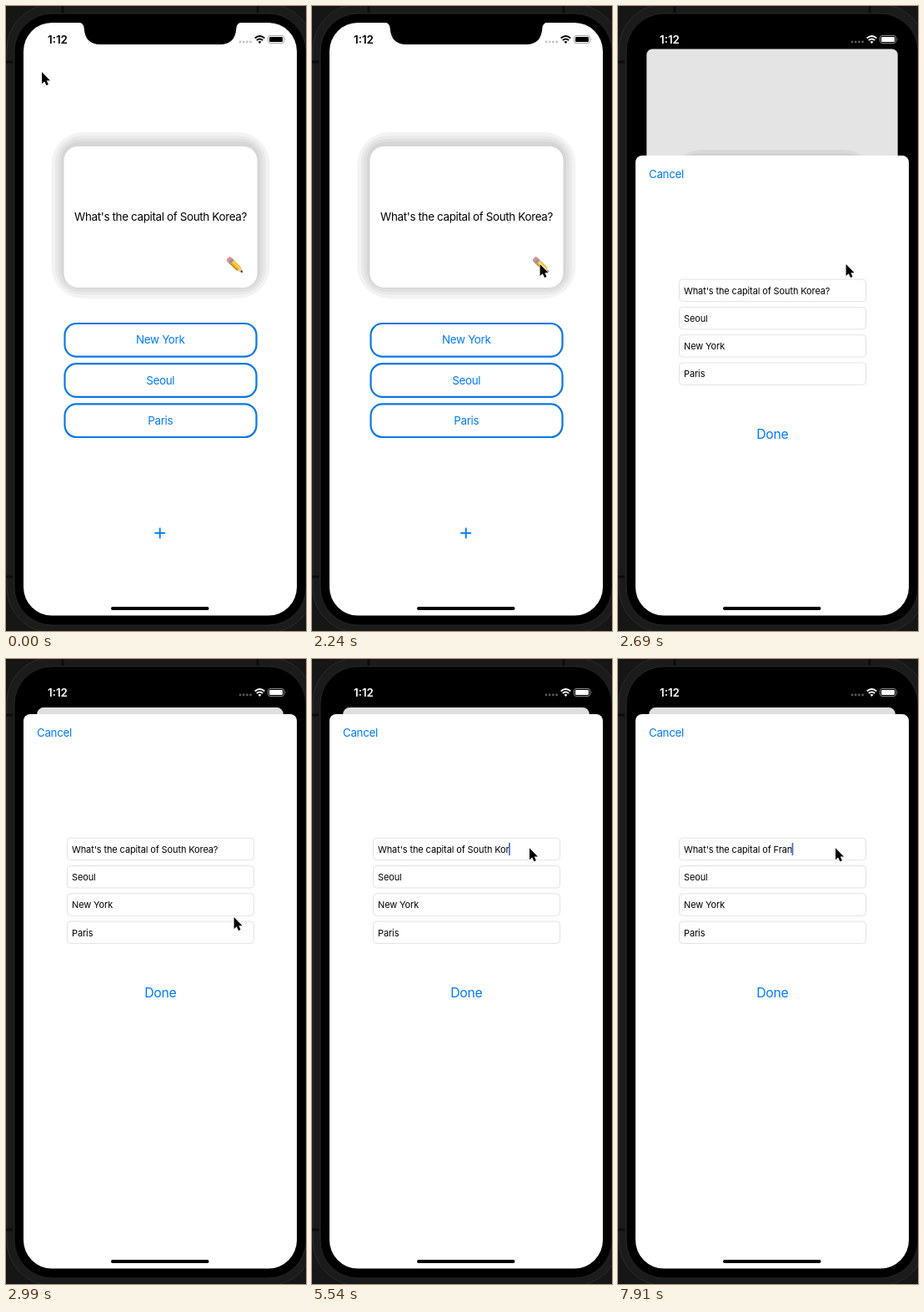
An HTML page that plays this animation: 360 px wide and 748 px high, repeating every 8 s.

```html
<!DOCTYPE html>
<html lang="en">
<head>
<meta charset="utf-8">
<title>Quiz card editor</title>
<style>
  html, body { margin: 0; height: 100%; overflow: hidden; background: #161616; }
  svg { display: block; width: 100%; height: 100%; }
  text { font: 13.4px Inter, "Open Sans", sans-serif; letter-spacing: -.34px; white-space: pre; }
  .mid { text-anchor: middle; }
  .tint { fill: #007aff; }
  .clock { font-weight: 600; letter-spacing: 0; }
  .done { font-size: 15.8px; letter-spacing: -.36px; }
  #fields text { font-size: 11px; letter-spacing: -.12px; }
</style>
</head>
<body>
<svg viewBox="0 0 360 748">
  <defs>
    <clipPath id="screen"><rect x="21" y="20" width="328" height="709.5" rx="34"/></clipPath>
  </defs>

  <g id="phone">
    <rect x="1" y="-2" width="368" height="752" rx="54" fill="#1b1b1b" stroke="#2b2b2b"/>
    <path d="M0 67h8M0 683h8M68 0v8M302 0v8" stroke="#0c0c0c" stroke-width="3"/>
    <rect x="10" y="9" width="350" height="732" rx="45" stroke="#262626"/>
  </g>

  <g clip-path="url(#screen)">
    <g id="quiz">
      <rect id="page" x="21" y="20" width="328" height="720" fill="#fff"/>
      <g id="shadow"></g>
      <rect x="69.5" y="168" width="232" height="169" rx="17" fill="#fff"/>
      <text class="mid" x="185.5" y="257.3">What's the capital of South Korea?</text>
      <g transform="translate(266.3 301.8) rotate(44)">
        <rect y="-3.4" width="6" height="6.8" rx="2" fill="#e58a93"/>
        <rect x="3.8" y="-3.4" width="3.4" height="6.8" fill="#8d979c"/>
        <rect x="7" y="-3.4" width="11.5" height="6.8" fill="#f5b52e"/>
        <path d="M7-1.2h11.5" stroke="#fbd65c" stroke-width="1.8"/>
        <path d="M7 2.6h11.5" stroke="#c98416" stroke-width="1.6"/>
        <path d="M18.5-3.4 24.5 0 18.5 3.4Z" fill="#e9c699"/>
        <path d="M22-1.5 25 0 22 1.5Z" fill="#333"/>
      </g>
      <g id="answers"></g>
      <path d="M178.3 630.8h12.8M184.7 624.4v12.8" stroke="#007aff" stroke-width="1.9"/>
      <rect id="dim" x="21" y="20" width="328" height="720"/>
    </g>

    <g id="sheet">
      <rect x="21" y="66" width="328" height="700" rx="8" fill="#fff"/>
      <text class="tint" x="37" y="93.3">Cancel</text>
      <g id="fields"></g>
      <rect id="caret" y="220" width="1.7" height="15" fill="#4468dc"/>
      <text class="tint mid done" x="185.3" y="405">Done</text>
    </g>
    <rect x="126" y="719" width="117.5" height="4" rx="2"/>
  </g>

  <path d="M86 19Q93.5 20 93.7 27Q95 46 113 46H257Q275 46 276.3 27Q276.500 20 284 19Z"/>

  <g id="status">
    <text class="clock" x="50" y="44.6">1:12</text>
    <path d="M281 43h13" stroke="#999" stroke-opacity=".6" stroke-width="2.8" stroke-linecap="round" stroke-dasharray="0 4.200"/>
    <g fill="none" stroke="currentColor" stroke-width="1.9">
      <path d="M298.700 38.500q5.800-5 11.600 0M300.800 41q3.700-3.200 7.400 0"/>
    </g>
    <path d="M304.500 45l-2-2.200q2-1.500 4 0Z"/>
    <rect x="314.500" y="35.500" width="19" height="9" rx="2.500" fill="none" stroke="#999" stroke-width=".9"/>
    <rect x="316" y="37" width="16" height="6" rx="1.200"/>
    <path d="M335 38.500q1.500 1.500 0 3Z" fill="#999"/>
  </g>

  <path id="cursor" d="M0 0V14L3.200 11.200 5.400 16 7.900 14.900 5.800 10.200H10Z"
        stroke="#fff" stroke-width="1.500" paint-order="stroke"/>
</svg>

<script>
const LOOP = 8000;
const $ = id => document.getElementById(id);

// Each row holds from its start time until the next: [ms, ...values]
const pointer = [
  [0, 43, 79], [740, 90, 190], [890, 190, 420], [1040, 285, 602],
  [1340, 358.7, 703], [1490, 350, 640], [1640, 330, 540], [1790, 308, 440],
  [1940, 288, 360], [2090, 276, 320], [2240, 273.6, 309],
  [3440, 272, 296], [3590, 268, 275], [3740, 260, 250], [3890, 250, 232],
  [4040, 246, 226], [4190, 253.7, 225], [4340, 256, 226], [4490, 261, 226.3]
];
const opening = [[0, 0], [2540, .476], [2690, .83], [2840, .97], [2990, 1]];
const typing = [
  [0, "South Korea?"], [5240, "South Korea"], [5390, "South Kore"], [5540, "South Kor"],
  [5830, "South Ko"], [5980, "South K"], [6130, "South "], [6280, "South"],
  [6420, "Sout"], [6570, "Sou"], [6720, "S"], [7020, ""],
  [7320, "F"], [7620, "Fr"], [7770, "Fra"], [7910, "Fran"]
];
const CARET_ON = 4190;

const at = (rows, t) => rows.findLast(row => row[0] <= t).slice(1);
const mix = (a, b, p) => a + (b - a) * p;

$("shadow").innerHTML = [[15, 243], [10.5, 233], [7, 224], [3.5, 214]].map(([d, grey]) =>
  `<rect x="${69.5 - d}" y="${166 - d}" width="${232 + 2 * d}" height="${169 + 2 * d}"
    rx="${17 + 1.4 * d}" fill="rgb(${grey},${grey},${grey})"/>`).join("");

$("answers").innerHTML = ["New York", "Seoul", "Paris"].map((name, i) => {
  const y = 380 + 48.2 * i;
  return `<rect x="70.5" y="${y}" width="230" height="39.6" rx="14" fill="none" stroke="#0b77e3" stroke-width="2.2"/>
    <text class="mid" x="185.3" y="${y + 24.4}">${name}</text>`;
}).join("");

$("fields").innerHTML = ["", "Seoul", "New York", "Paris"].map((value, i) => {
  const y = 214.3 + 33.25 * i;
  return `<rect x="73.5" y="${y}" width="224" height="26.4" rx="4" fill="#fff" stroke="#e3e3e3"/>
    <text x="79" y="${y + 17.5}">${value}</text>`;
}).join("");
const question = $("fields").querySelector("text");

function draw() {
  const t = performance.now() % LOOP;
  const [x, y] = at(pointer, t);
  const [p] = at(opening, t);
  const [word] = at(typing, t);

  $("cursor").setAttribute("transform", `translate(${x} ${y})`);

  const scale = 1 - .098 * p;
  $("quiz").setAttribute("transform", `translate(${185 * (1 - scale)} ${40 * p}) scale(${scale})`);
  $("page").setAttribute("rx", 9 * p);
  $("dim").setAttribute("rx", 9 * p);
  $("dim").setAttribute("opacity", .126 * p);
  $("answers").setAttribute("fill", `rgb(${mix(0, 142, p)},${mix(122, 142, p)},${mix(245, 147, p)})`);
  $("sheet").setAttribute("transform", `translate(0 ${mix(664, 0, p)})`);

  const ink = p > .6 ? "#fff" : "#000";
  $("status").setAttribute("fill", ink);
  $("status").setAttribute("color", ink);

  question.textContent = "What's the capital of " + word;
  $("caret").setAttribute("x", 78.5 + question.getComputedTextLength());
  $("caret").setAttribute("opacity", t >= CARET_ON ? 1 : 0);

  requestAnimationFrame(draw);
}
draw();
</script>
</body>
</html>
```
